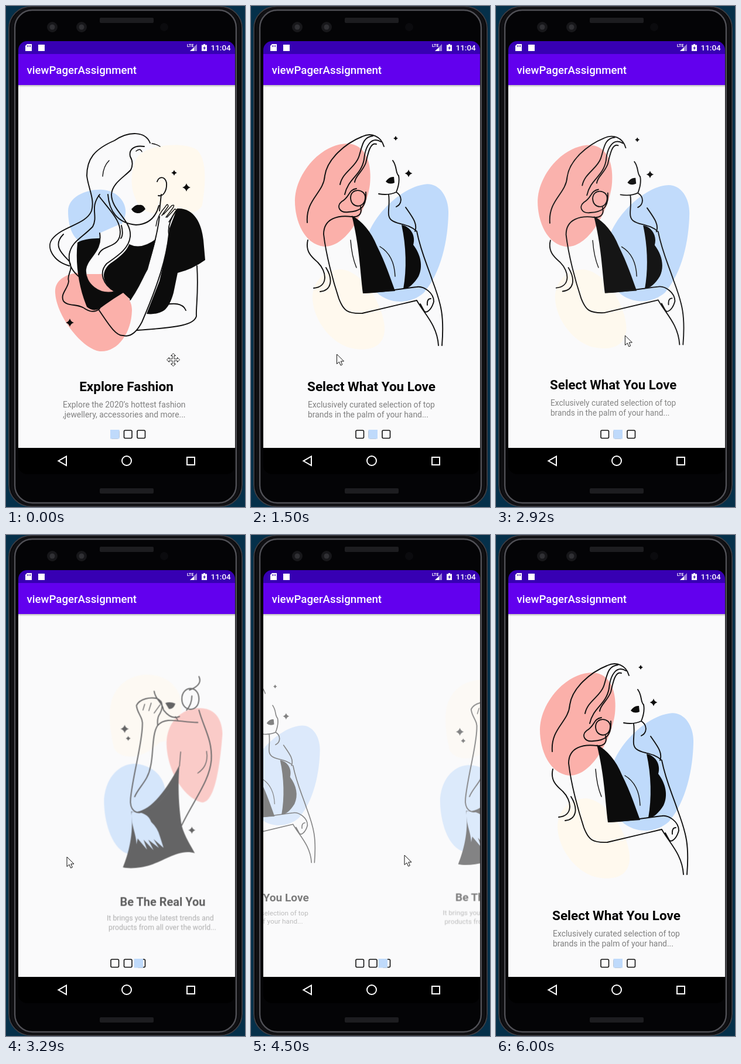
These frames come from a looping animation (408x856 px, 6.04 s). An HTML page:

```html
<!DOCTYPE html>
<html lang="en">
<head>
<meta charset="utf-8">
<title>View pager</title>
<style>
html, body { margin: 0; width: 100%; height: 100%; overflow: hidden; background: #000; }
svg { display: block; width: 408px; height: 856px; font-family: Roboto, "Noto Sans", sans-serif; }
.line { fill: none; stroke: #111; stroke-width: 1.9; stroke-linecap: round; stroke-linejoin: round; }
.thin { stroke-width: 1.4; }
.ink { fill: #0c0c0c; }
.paper { fill: #fafafb; }
.pink { fill: #fbb0aa; }
.blue { fill: #bfdafb; }
.yellow { fill: #fff9ee; }
.title { font-weight: 700; font-size: 22.5px; text-anchor: middle; fill: #000; }
.sub { font-size: 13.9px; fill: #808080; }
.nav { fill: none; stroke: #fff; stroke-width: 2; }
</style>
</head>
<body>
<svg id="stage" viewBox="0 0 408 856"></svg>
<script>
const PAGE_WIDTH = 370, CENTER_X = 206, CENTER_Y = 445, LOOP = 6040;
const MIN_SCALE = 0.85, INDICATOR_LAG = 50;

const shape = (cls, d) => `<path class="${cls}" d="${d}"/>`;
const lines = (cls, ...list) => shape('line ' + cls, list.join(' '));
const star = (x, y, r) => {
  const q = r * 0.22;
  return shape('ink', `M${x} ${y - r}Q${x + q} ${y - q} ${x + r} ${y}Q${x + q} ${y + q} ${x} ${y + r}` +
    `Q${x - q} ${y + q} ${x - r} ${y}Q${x - q} ${y - q} ${x} ${y - r}Z`);
};
const caption = (title, first, second, x1 = 97, x2 = 97) =>
  `<text class="title" x="205.5" y="657.5">${title}</text>
   <text class="sub" x="${x1}" y="686">${first}</text>
   <text class="sub" x="${x2}" y="703">${second}</text>`;

const explore =
  shape('yellow', 'M222 262C232 238 300 230 325 245C345 262 340 310 335 340C325 365 250 362 230 345C212 320 210 290 222 262Z') +
  shape('blue', 'M106 350C106 325 140 312 165 314C190 316 206 335 204 355C200 385 160 412 135 408C115 400 106 380 106 350Z') +
  shape('pink', 'M84 490C82 465 110 453 140 456C180 462 215 490 215 520C214 560 190 592 160 590C130 586 86 530 84 490Z') +
  shape('ink', 'M122 404C140 394 170 398 196 396Q222 424 256 398L242 450L213 502L200 490Q180 502 160 517Q148 523 138 514C124 480 118 440 122 404Z') +
  shape('ink', 'M292 346C320 344 334 370 337 400L340 434Q318 450 293 456L286 490Q280 512 270 520Q258 528 240 526L262 470Q276 410 279 380Z') +
  shape('paper', 'M160 388C165 420 138 430 136 450C134 475 160 495 186 488C165 475 160 455 178 440C200 425 214 412 212 392L196 372Z') +
  shape('pink', 'M137 458C139 478 162 494 186 488C172 479 165 468 165 458Z') +
  lines('',
    'M246 234C238 214 210 213 185 230C150 245 138 262 138 290C140 310 152 330 146 350C136 374 98 375 79 398C68 412 80 436 108 444',
    'M236 240C215 237 210 248 212 257C216 264 217 272 213 280C202 292 181 303 180 322C180 350 215 366 212 394C210 414 192 426 172 440C158 455 165 476 186 488C160 495 134 475 136 450C138 430 165 420 160 388',
    'M174 322C176 350 190 371 222 374C245 373 256 360 261 341',
    'M258 300C261 291 271 290 274 302C275 315 269 326 260 324M265 322L262 350',
    'M160 322C142 345 158 358 148 377C130 396 112 402 108 424C106 445 116 455 124 462',
    'M158 324C178 350 200 370 194 394C188 414 164 408 158 425',
    'M98 390C78 410 98 425 108 436C116 452 103 458 107 470C106 483 92 492 98 504C105 514 125 508 136 518Q150 526 160 517',
    'M262 360C259 385 250 420 240 450Q227 480 212 502',
    'M290 350Q275 372 278 390C274 430 260 475 232 540C222 559 211 566 200 563C187 564 174 542 159 520',
    'M326 444C329 490 324 515 325 530C321 545 295 549 224 554',
    'M307 520Q301 505 274 510M197 375Q201 391 196 397') +
  lines('thin',
    'M165 291Q166 274 176 264M222 248Q229 242 232 249M249 235Q257 236 263 240',
    'M256 376Q258 358 272 343Q276 336 277 342L266 358M269 356L283 341Q289 338 285 345L273 361M275 361L288 347Q293 347 289 352L278 369') +
  shape('ink', 'M214 347Q222 338 227 340Q234 338 238 347Q231 355 224 354Q217 353 214 347Z') +
  star(287, 285, 5) + star(308, 310, 7) + star(109, 541, 7) +
  caption('Explore Fashion', 'Explore the 2020’s hottest fashion', ',jewellery, accessories and more...');

const select =
  shape('yellow', 'M105 495C108 465 130 450 155 450C195 455 230 520 228 555C225 590 190 590 165 583C130 570 104 530 105 495Z') +
  shape('pink', 'M75 330C77 285 120 235 165 235C200 237 206 275 203 305C198 345 165 412 125 411C90 408 74 365 75 330Z') +
  shape('blue', 'M337 355C338 325 320 300 295 305C260 310 215 350 200 390C188 430 192 470 215 490C240 512 275 508 295 490C325 455 336 400 337 355Z') +
  shape('ink', 'M172 358C190 368 205 385 215 410C230 440 238 465 246 487L191 491C186 450 185 410 172 358Z') +
  shape('ink', 'M257 374C270 376 282 390 277 408C290 425 294 445 286 462C278 475 268 484 260 483C266 450 265 410 257 374Z') +
  lines('',
    'M227 240C222 222 205 216 190 223C160 235 130 262 126 290C124 320 93 330 96 370',
    'M222 232C205 222 195 240 193 262C188 290 166 294 160 322',
    'M208 222C190 224 190 240 184 258C178 276 156 284 152 305',
    'M214 236C204 232 200 250 196 268C190 284 178 290 177 301',
    'M242 264C250 275 246 284 252 290C254 300 252 308 248 318Q235 324 218 321',
    'M170 328C170 310 195 312 195 327C195 346 171 347 170 328',
    'M196 318C198 345 185 351 166 352C151 354 145 342 155 334C169 326 166 314 180 312',
    'M187 343C191 358 180 361 172 360C150 357 124 362 124 390C128 425 140 470 150 500C158 521 165 526 190 525L283 503',
    'M97 400C92 420 105 430 114 438C130 454 132 480 107 482M128 447C141 468 137 486 118 488',
    'M235 322C238 345 230 358 240 366C250 374 268 371 283 385',
    'M264 344C275 360 285 372 280 385M248 318C259 325 258 338 248 343',
    'M283 385C290 420 300 440 310 470C325 510 330 530 326 580M283 503C295 525 318 545 320 580',
    'M192 490C220 490 262 482 283 480C295 478 312 490 312 505C308 520 298 527 295 520L289 509M307 500Q300 500 301 511') +
  lines('thin', 'M220 411C235 420 245 435 246 462M170 400Q172 428 180 447') +
  shape('ink', 'M230 300Q236 291 244 292L245 302Q236 306 230 300Z') +
  star(247, 226, 4) + star(269, 286, 6.5) +
  caption('Select What You Love', 'Exclusively curated selection of top', 'brands in the palm of your hand...');

const beReal =
  `<g transform="translate(206 445) scale(1.1325) translate(-271 -445)">` +
  shape('yellow', 'M240 240C275 238 305 260 302 300C295 340 290 350 265 355C235 385 200 385 188 365C180 330 178 300 185 280C195 255 215 242 240 240Z') +
  shape('pink', 'M320 298C350 292 370 305 372 340C368 390 360 455 338 457C305 450 277 400 277 355C278 325 295 305 320 298Z') +
  shape('blue', 'M171 450C175 410 200 390 225 391C260 395 278 420 275 450C270 500 250 545 215 545C185 540 170 490 171 450Z') +
  shape('ink', 'M299 393C295 440 300 480 303 497C308 515 318 530 325 543C300 535 275 555 250 563C235 568 215 570 203 567C212 545 222 510 217 472C240 478 270 450 299 393Z') +
  shape('blue', 'M218 473C235 472 247 478 251 490Q262 500 266 515L272 534L255 519L264 534L246 520L255 538L238 520L244 537L228 518L226 528C226 510 216 495 218 473Z') +
  lines('',
    'M256 268C258 283 270 286 272 300Q285 317 299 311',
    'M303 281C303 258 332 257 332 281C332 305 303 304 303 281M332 243C338 255 326 262 316 266M320 276Q320 290 311 300',
    'M330 321C300 321 276 310 262 326C252 340 255 375 250 395C246 420 230 430 223 447',
    'M332 300C340 330 355 350 353 385C350 420 325 450 302 497',
    'M226 292C232 280 250 278 260 280C274 285 270 300 264 309Q261 315 262 326',
    'M226 292C227 306 238 312 236 327C235 360 220 410 216 450C214 470 225 478 240 472C255 466 270 452 281 437') +
  lines('thin', 'M345 370C348 390 340 400 330 407M237 300L240 290M247 301L251 288M256 305L266 291M301 371L299 395M292 311L296 317') +
  shape('ink', 'M275 288Q283 285 292 289Q289 299 281 298Z') +
  star(206, 332, 7) + star(212, 348, 4) + star(320, 504, 6) + '</g>' +
  caption('Be The Real You', 'It brings you the latest trends and', 'products from all over the world...', 98, 101.5);

const frameRect = (x, y, r, color, width) =>
  `<rect x="${x}" y="${y}" width="${408 - 2 * x}" height="${856 - 2 * y}" rx="${r}" fill="none" stroke="${color}" stroke-width="${width}"/>`;
const camera = x =>
  `<circle cx="${x}" cy="36" r="9" fill="#17171a"/><circle cx="${x}" cy="36" r="4.5" fill="#303034"/>`;
const speaker = y => `<rect x="160" y="${y}" width="92" height="9" rx="2" fill="#1d1d20"/>`;

const phone =
  `<rect width="408" height="856" fill="#05304a"/>
   <rect x="4" y="1" width="400" height="854" rx="38" fill="#040406"/>` +
  frameRect(5, 1, 37, '#3c3c42', 2) + frameRect(10, 4, 34, '#101013', 5) + frameRect(15, 7, 30, '#505056', 2.5) +
  speaker(20) + speaker(824) + camera(79) + camera(129) +
  `<circle cx="270" cy="36" r="7" fill="#0b0b0e"/>
   <g clip-path="url(#screen)">
     <rect x="21" y="60" width="370" height="740" fill="#000"/>
     <rect x="21" y="135" width="370" height="620" class="paper"/>
     <rect x="21" y="60" width="370" height="22" fill="#3700b3"/>
     <rect x="21" y="82" width="370" height="53" fill="#6200ee"/>
     <rect x="21" y="135" width="370" height="4" fill="url(#shadow)"/>
   </g>
   <g fill="#fff">
     <path d="M36 65H44V77H33V68Z"/><path d="M36.500 67V70M39 67V70M41.500 67V70" stroke="#3700b3"/>
     <rect x="55" y="66" width="11" height="11"/>
     <text x="309" y="70" font-size="7" font-weight="700">LTE</text>
     <path d="M326 65V77H314Z" opacity=".5"/><path d="M321 71V77H314Z"/>
     <path d="M337 65H340V66.500H343V77H334V66.500H337Z"/><path d="M339.500 68L336.500 72.500H338.500L337.500 76L341 71H339Z" fill="#3700b3"/>
     <text x="349.500" y="76" font-size="13.5" font-weight="500">11:04</text>
     <text x="35.500" y="116" font-size="18.7" font-weight="500">viewPagerAssignment</text>
   </g>
   <path class="nav" d="M103 769.500V785L89.500 777.300Z"/>
   <circle class="nav" cx="206" cy="777" r="8"/>
   <rect class="nav" x="309" y="771" width="13" height="13"/>`;

const dots = [0, 1, 2].map(i =>
  `<rect x="${179 + 22.5 * i}" y="725" width="13.500" height="13.500" rx="2" fill="none" stroke="#111" stroke-width="1.600"/>`).join('');

const stage = document.getElementById('stage');
stage.innerHTML =
  `<defs>
     <clipPath id="screen"><rect x="21" y="60" width="370" height="740" rx="15"/></clipPath>
     <clipPath id="pager"><rect x="21" y="135" width="370" height="620"/></clipPath>
     <linearGradient id="shadow" x2="0" y2="1"><stop stop-color="#bbb"/><stop offset="1" stop-color="#fafafb"/></linearGradient>
   </defs>` + phone +
  `<g clip-path="url(#pager)">${[explore, select, beReal].map(p => `<g class="page">${p}</g>`).join('')}</g>` + dots +
  `<rect id="marker" y="724" width="15.500" height="15.500" class="blue"/>
   <path id="arrow" d="M0 0V16.500L4 13L6.500 19L9.300 17.800L6.800 12H12Z" fill="#fff" stroke="#111" stroke-width="1"/>
   <path id="move" transform="translate(285.500 604.500)" fill="#fff" stroke="#222" stroke-width="1"
     d="M0 -11L4 -7H1.500V-1.500H7V-4L11 0L7 4V1.500H1.500V7H4L0 11L-4 7H-1.500V1.500H-7V4L-11 0L-7 -4V-1.500H-1.500V-7H-4Z"/>`;

const pages = [...stage.querySelectorAll('.page')];
const [marker, arrow, move] = ['marker', 'arrow', 'move'].map(id => document.getElementById(id));

// Each swipe: drag start, release, settle end, then page offsets at those times.
const swipes = [
  [860, 1080, 1380, 0, 0.31, 1],
  [1580, 1740, 2000, 1, 0.65, 0],
  [2060, 2240, 2700, 0, 0.36, 1],
  [2915, 3100, 3530, 1, 1.35, 2],
  [4350, 4440, 4840, 2, 1.82, 1]
];

function scrollAt(t) {
  let offset = 0;
  for (const [start, release, end, from, held, to] of swipes) {
    if (t < start) break;
    if (t < release) offset = from + (held - from) * (t - start) / (release - start);
    else offset = to + (held - to) * Math.max(0, 1 - (t - release) / (end - release)) ** 3;
  }
  return offset;
}

const cursorPath = [
  [0, 284, 595], [800, 284, 595], [1040, 159, 593], [1080, 146, 595], [1500, 146, 595],
  [1740, 276, 590], [2010, 280, 586], [2240, 148, 580], [2560, 148, 577], [2820, 255, 567],
  [2920, 221, 563], [3100, 108, 552], [3290, 104, 550], [3600, 104, 550], [3850, 252, 545],
  [4080, 252, 545], [4170, 100, 548], [4330, 100, 548], [4460, 255, 547], [4500, 262, 547],
  [5000, 262, 547], [5500, 235, 860], [LOOP, 235, 860]
];

function cursorAt(t) {
  const i = cursorPath.findIndex(key => key[0] > t);
  const [t0, x0, y0] = cursorPath[i - 1], [t1, x1, y1] = cursorPath[i];
  const u = (t - t0) / (t1 - t0);
  return [x0 + (x1 - x0) * u, y0 + (y1 - y0) * u];
}

function draw(t) {
  const offset = scrollAt(t);
  pages.forEach((page, i) => {
    const pos = i - offset;
    const scale = Math.max(MIN_SCALE, 1 - Math.abs(pos));
    const x = CENTER_X + PAGE_WIDTH * pos + (pos < 0 ? -100 : 185) * (1 - scale);
    page.style.display = Math.abs(pos) < 1 ? '' : 'none';
    page.setAttribute('opacity', 0.5 + 0.5 * (scale - MIN_SCALE) / (1 - MIN_SCALE));
    page.setAttribute('transform',
      `translate(${x} ${CENTER_Y}) scale(${scale}) translate(${-CENTER_X} ${-CENTER_Y})`);
  });
  marker.setAttribute('x', 178 + 22.5 * scrollAt(t - INDICATOR_LAG));
  const moving = t < 130;
  move.style.display = moving ? '' : 'none';
  arrow.style.display = moving ? 'none' : '';
  arrow.setAttribute('transform', `translate(${cursorAt(t)})`);
}

const begin = performance.now();
function tick() {
  draw((performance.now() - begin) % LOOP);
  requestAnimationFrame(tick);
}
tick();
</script>
</body>
</html>
```
